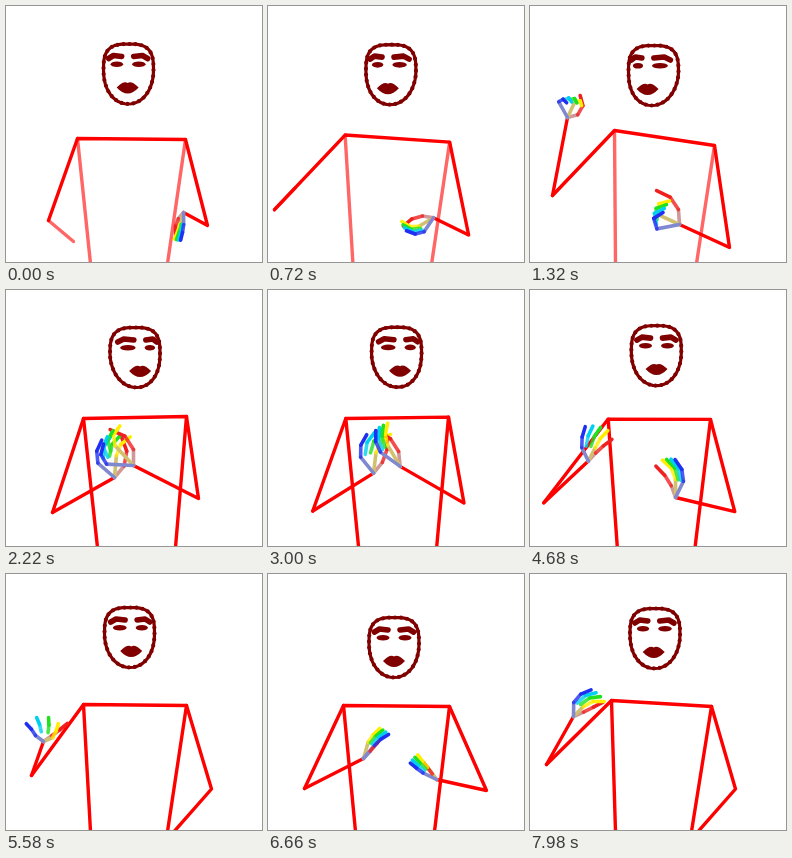
An HTML page with a canvas for the animation above (8 s loop, 256x256 px).

```html
<!DOCTYPE html>
<html lang="en">
<head>
<meta charset="utf-8">
<title>Signing figure</title>
<style>
html, body { margin: 0; width: 100%; height: 100%; overflow: hidden; background: #fff; }
canvas { display: block; width: 100vw; height: 100vh; }
</style>
</head>
<body>
<canvas id="stage" width="256" height="256"></canvas>
<script>
const ctx = document.getElementById('stage').getContext('2d');
const LOOP = 8000, STEP = 60, SWING = 28;

// left, right: shoulder, elbow, wrist; hips: x of both sides at the bottom edge
// face: centre x, centre y, turn; alpha: torso, left forearm
// hand: direction, half spread, palm length, finger segment, curl,
//       thumb direction, thumb segment, thumb curl (angles in degrees)
const pose = parts => ({ alpha: [1, 1], leftHand: null, rightHand: null, ...parts });
const lowered = [205, 214.5, 150, 277];

const rest = pose({
  left: [71, 132, 42, 214, 67, 235], right: [179, 133, 201, 219, 177, 206],
  hips: [84, 161], face: [122, 67.5, -1], alpha: [.6, .6],
  rightHand: [98, -9, 12, 8, 5, 130, 8, -20]
});
const raised = pose({
  left: [84, 124, 22, 189, 37, 111], right: [184, 139, 199, 241, 149, 218],
  hips: [85, 166], face: [123, 69, -7], alpha: [.6, 1],
  leftHand: [-92, -27, 18, 5, 75, -15, 10.5, -45],
  rightHand: [187, -18, 23, 11, 75, 266, 15, -30]
});
const crossed = pose({
  left: [77, 128, 46, 222, 108, 187], right: [180, 126, 192, 208, 127, 175],
  hips: [91, 169], face: [128.5, 67, 6],
  leftHand: [-112, -27, 22, 12, 30, -50, 15, -30],
  rightHand: [205, -22, 27, 11, 45, 270, 16, -33]
});
const joined = pose({
  left: [78, 128, 40, 217, 98, 172], right: [180, 128, 204, 224, 143, 178],
  hips: [88, 166], face: [127, 66, -.5],
  leftHand: [-92, -13, 17, 12, 25, -53, 11, 8],
  rightHand: [283, 13, 18, 12, -27, 250, 12.5, -12]
});
const fanned = pose({
  left: [77, 130, 25, 201, 37, 167], right: [180, 131, ...lowered],
  hips: [84, 161], face: [123, 63, 2],
  leftHand: [-83, -60, 10, 7.5, -10, -35, 10, -2]
});
const apart = pose({
  left: [75, 131, 36, 214, 95, 184], right: [181, 132, 218, 216, 168, 205],
  hips: [87, 166], face: [125.5, 73, 0],
  leftHand: [-62, 12, 17, 9, 12, -47, 10, -3],
  rightHand: [220, -14, 15, 8, 3, 233, 7, 0]
});
const pinched = pose({
  left: [81, 126, 16, 190, 43, 142], right: [181, 132, ...lowered],
  hips: [85, 161], face: [124.5, 64, -1.5],
  leftHand: [-67, -22, 14, 11, 28, -24, 11, -2]
});

// time, pose, whether the left arm swings outwards on the way to the next pose
const timeline = [
  [0, rest, 1], [1320, raised, 1], [2220, crossed, 0], [3840, joined, 1],
  [5580, fanned, 1], [6660, apart, 0], [7980, pinched, 0], [LOOP, pinched, 0]
];

const mix = (a, b, k) => a + (b - a) * k;
const mixList = (a, b, k) => a.map((v, i) => mix(v, b[i], k));

// holds the pose briefly, then moves smoothly
function ease(u) {
  const k = Math.min(1, Math.max(0, (u - .25) / .65));
  return k * k * (3 - 2 * k);
}

function poseAt(t) {
  const next = timeline.findIndex(key => t < key[0]);
  const [t0, a, swings] = timeline[next - 1], [t1, b] = timeline[next];
  const k = ease((t - t0) / (t1 - t0));
  const result = {};
  for (const part in a) {
    if (a[part] && b[part]) result[part] = mixList(a[part], b[part], k);
    else result[part] = k < .5 ? a[part] : b[part];
  }
  const swing = swings * SWING * Math.sin(Math.PI * k);
  result.left[2] -= swing;
  result.left[4] -= swing;
  return result;
}

function stroke(points, color, width, alpha = 1) {
  ctx.globalAlpha = alpha;
  ctx.strokeStyle = color;
  ctx.lineWidth = width;
  ctx.beginPath();
  points.forEach(([x, y]) => ctx.lineTo(x, y));
  ctx.stroke();
  ctx.globalAlpha = 1;
}

const pairs = list => list.flatMap((v, i) => i % 2 ? [] : [[v, list[i + 1]]]);

function drawBody({ left, right, hips, alpha }) {
  const [ls, le, lw] = pairs(left), [rs, re, rw] = pairs(right);
  stroke([ls, [hips[0], 257]], '#f00', 3.4, alpha[0]);
  stroke([rs, [hips[1], 257]], '#f00', 3.4, alpha[0]);
  stroke([le, lw], '#f00', 3.4, alpha[1]);
  stroke([le, ls, rs, re, rw], '#f00', 3.4);
}

// boxy superellipse above the cheeks, rounder below
function faceOutline(cx, cy, turn) {
  return Array.from({ length: 49 }, (_, i) => {
    const angle = i / 48 * 2 * Math.PI, c = Math.cos(angle), s = Math.sin(angle);
    const power = s < 0 ? 2 / 3 : .95;
    const x = 25 * Math.sign(c) * Math.abs(c) ** power;
    const y = (s < 0 ? 26 : 34) * Math.sign(s) * Math.abs(s) ** power - 4;
    return [cx + x + Math.max(0, y) * turn / 120, cy + y];
  });
}

function drawFace([cx, cy, turn]) {
  const maroon = '#800000';
  const outline = faceOutline(cx, cy, turn);
  stroke(outline, maroon, 3.2);
  ctx.setLineDash([0, 6]);
  stroke(outline, maroon, 4.2);
  ctx.setLineDash([]);

  ctx.fillStyle = maroon;
  for (const side of [-1, 1]) {
    const scale = 1 - side * turn * .032;
    const at = (x, y) => [cx + turn + side * x * scale, cy + y];
    stroke([at(19.5, -15.5), at(14.5, -18.5), at(6, -17.5)], maroon, 5.6);
    ctx.beginPath();
    ctx.ellipse(...at(11, -9.8), 6.5 * scale, 2.8, 0, 0, 2 * Math.PI);
    ctx.fill();
  }
  const mouthX = cx + turn * .85, mouthY = cy + 13.5;
  ctx.beginPath();
  ctx.moveTo(mouthX - 11, mouthY);
  ctx.quadraticCurveTo(mouthX - 4, mouthY - 7, mouthX, mouthY - 4.5);
  ctx.quadraticCurveTo(mouthX + 4, mouthY - 7, mouthX + 11, mouthY);
  ctx.quadraticCurveTo(mouthX, mouthY + 12, mouthX - 11, mouthY);
  ctx.fill();
}

const FINGERS = [
  { tip: '#f02020', palm: '#d09898' }, { tip: '#ffee00', palm: '#d0c070' },
  { tip: '#20e020' }, { tip: '#00d0f0' }, { tip: '#2030f0', palm: '#8088d0' }
];

// a chain of points, each reached by a [degrees, length] step
function chain(start, ...steps) {
  const points = [start];
  for (const [degrees, length] of steps) {
    const [x, y] = points[points.length - 1], angle = degrees * Math.PI / 180;
    points.push([x + length * Math.cos(angle), y + length * Math.sin(angle)]);
  }
  return points;
}

function drawHand(wrist, hand) {
  if (!hand) return;
  const [dir, spread, palm, segment, curl, thumbDir, thumbSegment, thumbCurl] = hand;
  const chains = FINGERS.map((_, n) => {
    if (n === 0)
      return chain(wrist, ...[0, 1, 2].map(i => [thumbDir + i * thumbCurl, thumbSegment]));
    const fan = spread * (n - 2.5) / 1.5;
    const bent = dir + fan / 2;
    return chain(wrist, [dir + fan, palm], [bent + curl, segment], [bent + 2 * curl, segment]);
  });
  FINGERS.forEach(({ palm }, n) => palm && stroke(chains[n].slice(0, 2), palm, 3.6));
  FINGERS.forEach(({ tip }, n) => {
    stroke(chains[n].slice(1, 3), tip, 3.6, .8);
    stroke(chains[n].slice(2), tip, 3.6);
  });
}

function draw(now) {
  const time = now % LOOP;
  const current = poseAt(time < 2 * STEP ? 0 : Math.floor(time / STEP) * STEP);
  ctx.setTransform(1, 0, 0, 1, 0, 0);
  ctx.fillStyle = '#fff';
  ctx.fillRect(0, 0, 256, 256);
  ctx.translate(.5, .5);
  ctx.lineCap = ctx.lineJoin = 'round';
  drawBody(current);
  drawFace(current.face);
  drawHand(current.left.slice(4), current.leftHand);
  drawHand(current.right.slice(4), current.rightHand);
}

const start = performance.now();
function tick() {
  draw(performance.now() - start);
  requestAnimationFrame(tick);
}
tick();
</script>
</body>
</html>
```
